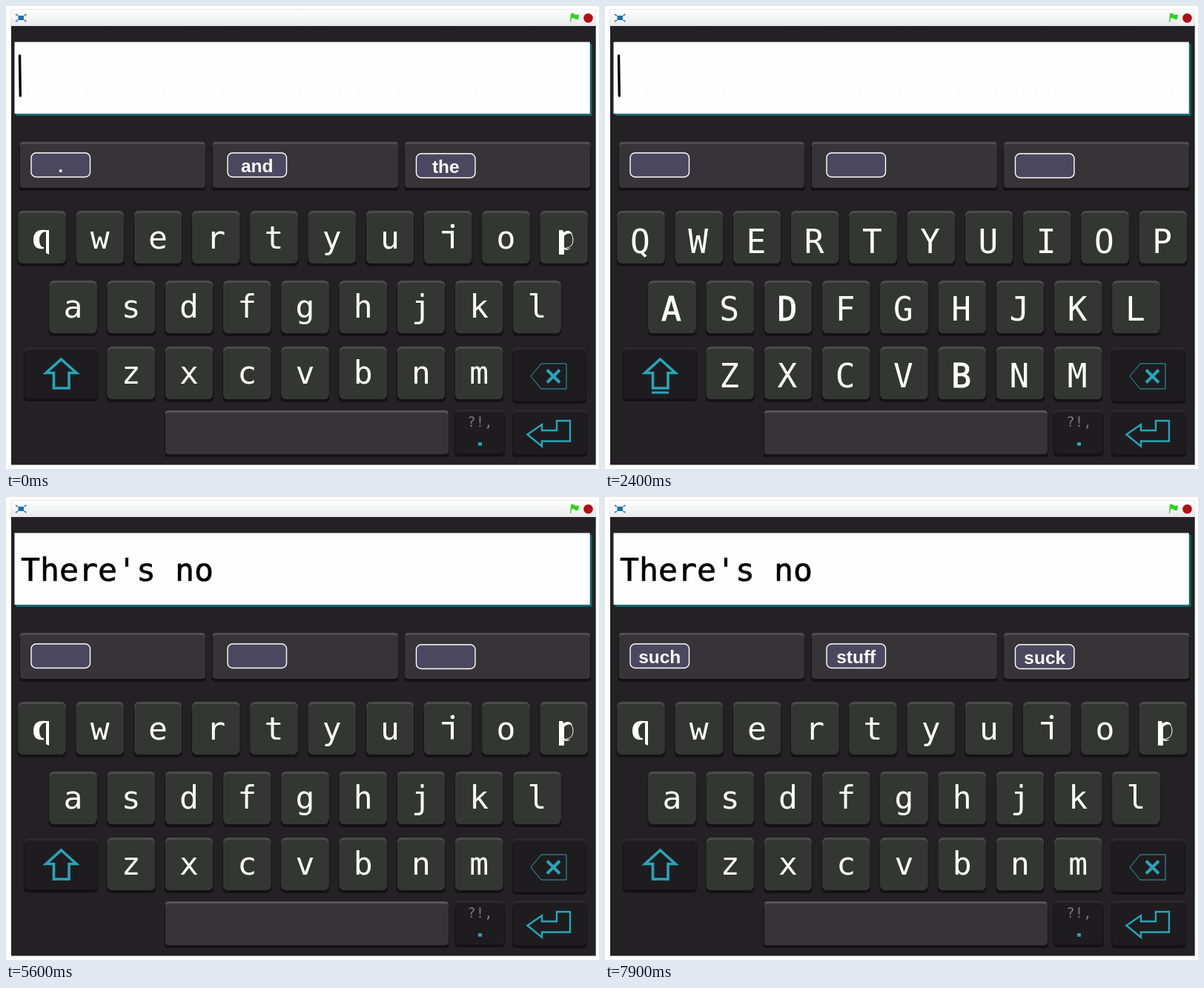
An HTML page that plays this animation: 800 by 624 pixels, repeating every 8 s.

```html
<!DOCTYPE html>
<html lang="en">
<head>
<meta charset="utf-8">
<title>Swipe keyboard</title>
<style>
  html, body { margin: 0; width: 100%; height: 100%; overflow: hidden; background: #fff; }
  svg { display: block; width: 800px; height: 624px; }
  .key { font: 43px "DejaVu Sans Mono", monospace; fill: #fff; text-anchor: middle; }
  .capital { font-size: 44.5px; }
  .heavy { stroke: #fff; stroke-width: 1; }
  .entry { font: 43.2px "DejaVu Sans Mono", monospace; stroke: #000; stroke-width: 0.6; }
  .word { font: bold 24.5px "Liberation Sans", Arial, sans-serif; fill: #fff; text-anchor: middle; }
  .marks { font: 19px "DejaVu Sans Mono", monospace; fill: #777578; text-anchor: middle; }
  .line { fill: none; stroke: #27a5b9; }
  .round { fill: none; stroke-linecap: round; stroke-linejoin: round; }
</style>
</head>
<body>
<svg id="stage" viewBox="0 0 800 624"></svg>
<script>
const stage = document.getElementById('stage');
const LOOP = 8000;

function add(parent, tag, attrs = {}, text) {
  const node = document.createElementNS('http://www.w3.org/2000/svg', tag);
  for (const name in attrs) node.setAttribute(name, attrs[name]);
  if (text !== undefined) node.textContent = text;
  parent.appendChild(node);
  return node;
}

function rect(x, y, width, height, fill, rx = 0) {
  return add(stage, 'rect', { x, y, width, height, fill, rx });
}

// A raised button: shadow below, light rim above, face in between.
function button(x, y, w, h, face, rim, rx) {
  rect(x - 1, y + 4, w + 2, h - 3, '#141314', rx);
  rect(x, y, w, h - 4, rim, rx);
  rect(x, y + 3, w, h - 6, face, rx);
}

// Window frame
const defs = add(stage, 'defs');
const bar = add(defs, 'linearGradient', { id: 'bar', x2: 0, y2: 1 });
add(bar, 'stop', { offset: 0, 'stop-color': '#fff' });
add(bar, 'stop', { offset: 1, 'stop-color': '#e6e7e8' });
const touchFill = add(defs, 'radialGradient', { id: 'touch' });
add(touchFill, 'stop', { offset: 0, 'stop-color': '#3d3b3d' });
add(touchFill, 'stop', { offset: 1, 'stop-color': '#4b494b' });

rect(6.5, 4.5, 789.5, 30, '#d5d6d8', 3);
rect(7, 5, 788.5, 24, 'url(#bar)', 3);
rect(7, 27, 788.7, 591.4, '#232123');
rect(16.5, 13, 7.5, 6, '#1f6fa8');
add(stage, 'path', {
  d: 'M13 11l3 2M27.5 11l-3 2M13 21l3-2M27.5 21l-3-2', stroke: '#3a87bd', 'stroke-width': 1.8
});
add(stage, 'path', { d: 'M762 10q3 -1 5 1t6 0l-1 7q-3 1 -5 -1t-4 0l-1 5h-1z', fill: '#2fd321' });
add(stage, 'circle', { cx: 785.5, cy: 16.3, r: 6.3, fill: '#b01014' });

// Text field
rect(14, 51, 776.6, 97, '#10666c');
rect(11.5, 48.5, 776.3, 96.7, '#fefdff');
const dots = Array.from({ length: 29 }, (_, i) => rect(28.5 + 26.3 * i, 115.5, 1, 1, '#e6e4e8'));
const entry = add(stage, 'text', { class: 'entry', x: 20, y: 113 });
const caret = add(stage, 'path', { class: 'round', d: 'M18.5 67L19.3 121', stroke: '#000', 'stroke-width': 3.4 });

// Suggestions
const pills = [[19, 34, 198], [279, 299, 198], [538.5, 553.5, 199]].map(([panelX, x, y]) => {
  button(panelX, 183, 249.5, 65, '#363436', '#504e51', 4);
  const box = rect(x, y, 79.5, 32.5, '#4a475f', 6.5);
  box.setAttribute('stroke', '#fff');
  box.setAttribute('stroke-width', 1.4);
  const label = add(stage, 'text', { class: 'word', y: y + 26 });
  return { x, box, label };
});

// Letter keys
const rows = [
  { letters: 'qwertyuiop', x: 48.5, y: 276, low: 326.5, high: 333 },
  { letters: 'asdfghjkl', x: 90.5, y: 370, low: 420, high: 424 },
  { letters: 'zxcvbnm', x: 168.7, y: 459, low: 509, high: 514 }
];
for (const { letters, x, y } of rows)
  [...letters].forEach((_, i) => button(x + 78.25 * i - 32, y, 64, 74, '#333633', '#4b4c4b', 6));

const lower = add(stage, 'g');
const upper = add(stage, 'g');
for (const { letters, x, low, high } of rows) {
  [...letters].forEach((letter, i) => {
    const cx = x + 78.25 * i;
    if (!'qip'.includes(letter)) add(lower, 'text', { class: 'key', x: cx, y: low }, letter);
    const heavy = 'abd'.includes(letter) ? ' heavy' : '';
    add(upper, 'text', { class: 'key capital' + heavy, x: cx - 1, y: high }, letter.toUpperCase());
  });
}
// q, i and p have uneven shapes
add(lower, 'path', {
  d: 'M54 302Q37 300 37 315Q37 329 51 327V325Q45 325 45 315Q45 305 54 304V333L58 335V302Z', fill: '#fff'
});
add(lower, 'path', { d: 'M588 303H604V326.5H600V306.5H588Z', fill: '#fff' });
add(lower, 'circle', { cx: 602.5, cy: 296.5, r: 2.7, fill: '#fff' });
add(lower, 'path', { d: 'M746 302h5l1 3q8 -5 12 2q-7 -2 -11 3v15q5 4 10 1q-5 4 -10 2v7h-7z', fill: '#fff' });
add(lower, 'path', { d: 'M756 304Q765 305 765 315T756 326', fill: 'none', stroke: '#fff', 'stroke-width': 1 });

// Function keys
const dark = (x, y, w, h) => button(x, y, w, h, '#1f1c1f', '#2b292b', 5);
const line = (d, width) => add(stage, 'path', { class: 'line', d, 'stroke-width': width });
dark(25, 460, 98, 72);
dark(684, 460, 98, 75);
dark(606, 544, 66, 62);
dark(684, 544, 99, 63);
button(215, 545, 381.5, 62, '#363436', '#575558', 4);
line('M74.5 476L95 494.5H85V515H64.5V494.5H54Z', 3.6);
const capsLine = line('M63 521H86', 3);
line('M708 499L722 482H756V516H722Z', 1);
line('M730 490.5L747 507.5M747 490.5L730 507.5', 4);
line('M703.5 577.5L723 564V572H743V559H761V586.5H723V593.5Z', 2.4);
add(stage, 'text', { class: 'marks', x: 639.5, y: 567 }, '?!,');
rect(637, 588, 5, 4.5, '#27a5b9');

// Touch and trail
const smear = add(stage, 'polyline', { class: 'round', stroke: '#fff', 'stroke-opacity': 0.13 });
const touch = add(stage, 'circle', { r: 15, fill: 'url(#touch)' });
const trail = add(stage, 'polyline', { class: 'round', stroke: '#27a5b9', 'stroke-width': 9 });

const strokes = [
  { end: 2300, path: [[1100, 366, 314], [1300, 430, 378], [1400, 502, 425], [1500, 420, 380], [1600, 255, 313],
    [1700, 213, 313], [1800, 245, 316], [1900, 285, 313], [2000, 225, 312], [2150, 172, 406]] },
  { end: 7300, path: [[6300, 178, 408], [6400, 415, 325], [6500, 505, 314], [6700, 400, 420],
    [6800, 325, 496], [7000, 400, 450], [7200, 482, 407]] }
];
const taps = [[400, 600, 75, 497], [3300, 3600, 204.5, 209], [5100, 5300, 150, 212]];
const suggestions = [
  [0, '.', 'and', 'the'], [1000, '', '', ''], [2600, "There's", 'Theta', 'Threads'],
  [3700, '', '', ''], [4800, 'no', '', ''], [5300, '', '', ''], [7400, 'such', 'stuff', 'suck']
];
const typed = [[0, ''], [3600, "There's "], [5300, "There's no "]];
const pillWidths = { "There's": 107.5, Theta: 86, Threads: 117 };

const latest = (list, t) => list.filter(item => item[0] <= t).pop();

function pointAt(path, t) {
  const i = path.findIndex(p => p[0] > t);
  if (i < 0) return path[path.length - 1].slice(1);
  if (i === 0) return path[0].slice(1);
  const [t0, x0, y0] = path[i - 1], [t1, x1, y1] = path[i];
  const k = (t - t0) / (t1 - t0);
  return [x0 + (x1 - x0) * k, y0 + (y1 - y0) * k];
}

function show(node, on) {
  node.setAttribute('visibility', on ? 'visible' : 'hidden');
}

function drawTouch(t) {
  const stroke = strokes.find(s => t >= s.path[0][0] && t < s.end);
  show(trail, stroke);
  show(smear, stroke);
  if (stroke) {
    const { path } = stroke;
    const head = pointAt(path, t), next = pointAt(path, t + 100);
    const points = path.filter(p => p[0] <= t).map(p => p.slice(1));
    trail.setAttribute('points', [...points, head].join(' '));
    smear.setAttribute('points', [pointAt(path, t - 50), head, next].join(' '));
    const speed = Math.hypot(next[0] - head[0], next[1] - head[1]);
    smear.setAttribute('stroke-width', Math.max(6, 30 - speed * 0.3));
  }
  const tap = taps.find(p => t >= p[0] && t < p[1]);
  show(touch, tap);
  if (tap) {
    touch.setAttribute('cx', tap[2]);
    touch.setAttribute('cy', tap[3]);
  }
}

function render(time) {
  const t = Math.floor(time / 100) * 100;
  const caps = t >= 600 && t < 2900;
  show(lower, !caps);
  show(upper, caps);
  show(capsLine, caps);

  const text = latest(typed, t)[1];
  entry.textContent = text.trim();
  dots.forEach((dot, i) => show(dot, i >= text.length));
  show(caret, t % 1000 < 500);
  caret.setAttribute('transform', `translate(${26.25 * text.length} 0)`);

  const words = latest(suggestions, t).slice(1);
  pills.forEach(({ x, box, label }, i) => {
    const width = pillWidths[words[i]] || 79.5;
    box.setAttribute('width', width);
    label.setAttribute('x', x + width / 2);
    label.textContent = words[i];
  });
  drawTouch(t);
}

const start = performance.now();
function tick() {
  render((performance.now() - start) % LOOP);
  requestAnimationFrame(tick);
}
tick();
</script>
</body>
</html>
```
